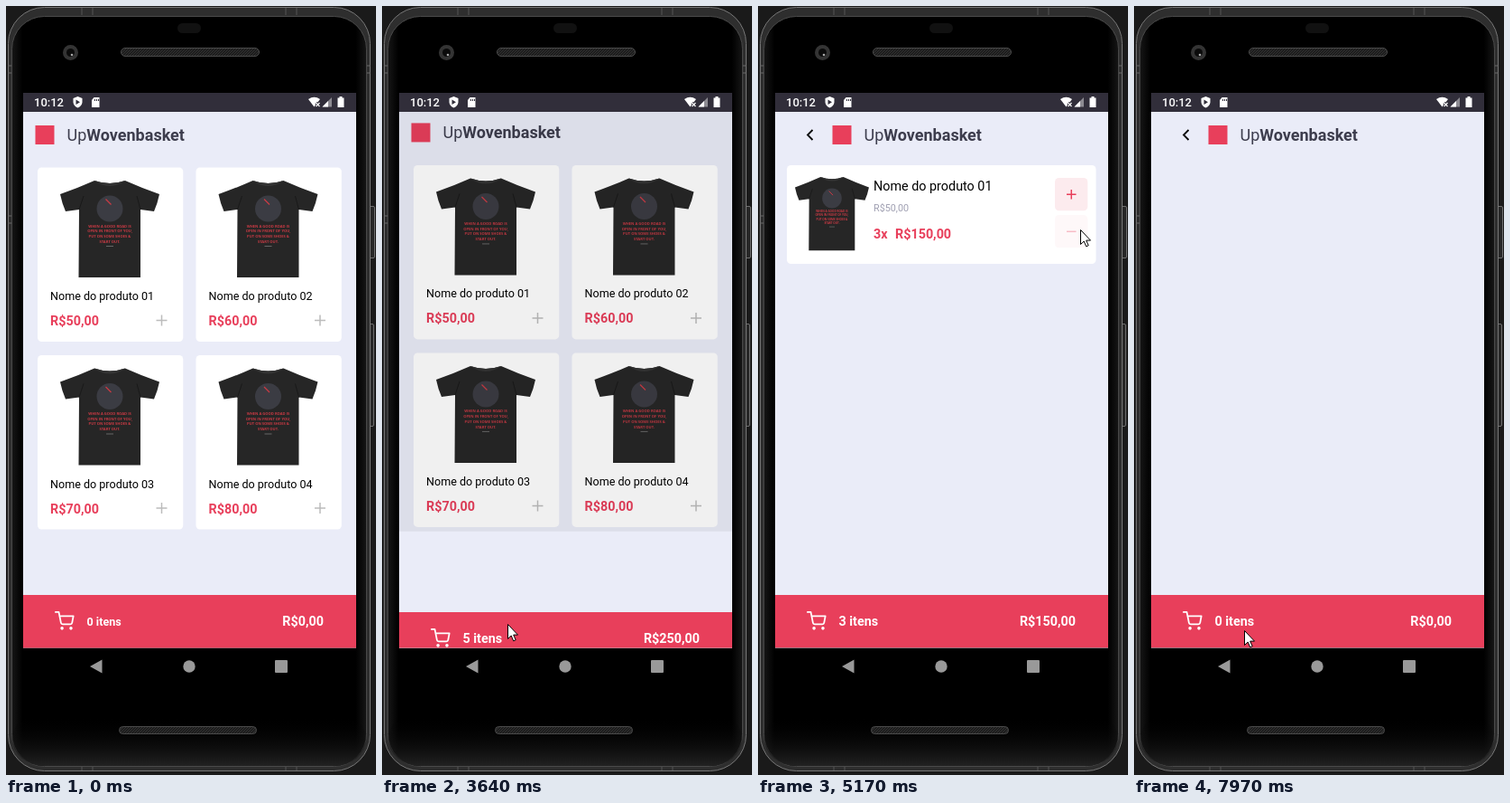
These frames come from a looping animation (410 by 850 pixels, 8 s). An HTML page:

```html
<!DOCTYPE html>
<html lang="pt-BR">
<head>
<meta charset="utf-8">
<title>Loja no celular</title>
<style>
html, body { margin: 0; width: 100%; height: 100%; overflow: hidden; background: #1a1a1a; }
svg { display: block; }
text { font: 14.37px Roboto, sans-serif; white-space: pre; }
.bold { font-weight: 700; }
.red { fill: #e83f5b; }
.white { fill: #fff; }
.brand { font-size: 18px; fill: #3d3d4d; }
.small { font-size: 12.57px; }
.print { font: 700 4.1px "Open Sans", sans-serif; fill: #c93a44; text-anchor: middle; }
.line { fill: none; stroke-width: 1.5; }
</style>
</head>
<body>
<svg id="stage" width="410" height="850" viewBox="0 0 410 850"></svg>
<script>
const LOOP = 8000, TOP = 117, HEIGHT = 592.5, UNIT_PRICE = 50;
const money = value => `R$${value},00`;

const header = x => `
  <rect x="${x}" y="132" width="21" height="21" class="red"/>
  <text x="${x + 35}" y="149" class="brand">Up<tspan class="bold">Wovenbasket</tspan></text>`;

const bar = (id, size) => `
  <rect x="19" y="651" width="369" height="60" class="red"/>
  <g transform="translate(54 669) scale(.898)" fill="none" stroke="#fff" stroke-width="2"
     stroke-linecap="round" stroke-linejoin="round">
    <circle cx="9" cy="21" r="1"/><circle cx="20" cy="21" r="1"/>
    <path d="M1 1h4l2.7 13.4a2 2 0 0 0 2 1.6h9.7a2 2 0 0 0 2-1.6L23 6H6"/>
  </g>
  <text id="${id}Count" x="89.5" y="685.3" class="bold white ${size}"></text>
  <text id="${id}Total" x="352" y="685.3" class="bold white" text-anchor="end"></text>`;

const product = i => `
  <g transform="translate(${i % 2 * 175.5} ${(i >> 1) * 207.5})">
    <rect x="35" y="178.5" width="161.3" height="192.5" rx="4.5" fill="#fff"/>
    <use href="#shirt"/>
    <text x="49" y="325" class="small">Nome do produto 0${i + 1}</text>
    <text x="49" y="353" class="bold red">${money(50 + i * 10)}</text>
    <path id="add${i}" d="M166.5 347.5h12M172.5 341.5v12" class="line" stroke="#bcbcbc"/>
  </g>`;

const button = (id, y, glyph) => `
  <g id="${id}">
    <rect x="329" y="${y}" width="36.3" height="36.3" rx="4.5" fill="#fcebee"/>
    <path d="${glyph}" class="line" stroke="#e83f5b"/>
  </g>`;

const slogan = ["WHEN A GOOD ROAD IS", "OPEN IN FRONT OF YOU,", "PUT ON SOME SHOES &amp;", "START OUT."];

const phone = `
  <rect width="410" height="850" fill="#1a1a1a"/>
  <g fill="#272727" stroke="#707070">
    <rect x="402.5" y="221.5" width="6" height="57" rx="1.5"/>
    <rect x="402.5" y="351.5" width="5" height="113" rx="1.5"/>
  </g>
  <rect x="2.5" y="1.5" width="401" height="844" rx="40" fill="#2e2e2e" stroke="#777"/>
  <path d="M2 66h6M2 74h6M2 232h6M2 240h6M398 66h6M398 74h6" stroke="#6a6a6a"/>
  <path d="M310 2v8M322 2v8M84 2v8M96 2v8M310 838v7M322 838v7M84 838v7M96 838v7" stroke="#555"/>
  <rect x="6.5" y="11.5" width="393" height="829" rx="36" fill="url(#sides)" stroke="#4a4a4a"/>
  <rect x="7" y="780" width="392" height="60" rx="35" fill="url(#bottomEdge)"/>
  <rect x="190" y="19" width="26" height="11" rx="5.5" fill="#111"/>
  <circle cx="71.5" cy="51.5" r="8.5" fill="#343434"/>
  <circle cx="71.5" cy="51.5" r="4.5" fill="#0b0b0b"/>
  <circle cx="73" cy="54" r="1.3" fill="#aaa"/>
  <g fill="url(#mesh)" stroke="#4a4a4a">
    <rect x="127.5" y="46.5" width="153" height="9" rx="4.5"/>
    <rect x="125.5" y="796.5" width="152" height="8" rx="4"/>
  </g>
  <rect x="19" y="96" width="369" height="640" fill="#000"/>
  <rect x="19" y="96" width="369" height="21" fill="#312e3a"/>
  <text x="31" y="111.4" class="white" style="font-size:13px;font-weight:500">10:12</text>
  <path d="M79.5 100l5 2v4.5q-.5 4-5 6q-4.5-2-5-6V102zM97.5 101h6v11h-8.5v-8z" class="white"/>
  <path d="M77.5 103.5v5.5l4.5-2.7z M98 103h1v2h-1zM100 103h1v2h-1zM102 103h1v2h-1z" fill="#312e3a"/>
  <path d="M335 103q6.5-4.5 13 0l-6.5 8.5z" class="white"/>
  <path d="M343.5 107l4 4m0-4l-4 4" stroke="#312e3a" stroke-width="3"/>
  <path d="M343.5 107l4 4m0-4l-4 4" stroke="#fff" stroke-width="1.2"/>
  <path d="M361 101v10.5h-10.5z" fill="#8d8b92"/>
  <path d="M357 105v6.5h-6.5z" class="white"/>
  <path d="M369.5 100h3v1.5h2V112h-7v-10.5h2z" class="white"/>
  <g fill="#999">
    <path d="M93 730l13.5-7.5v15z"/><circle cx="203" cy="730" r="6.7"/>
    <rect x="298" y="723" width="14" height="14" rx="1"/>
  </g>`;

const gradient = (id, vertical, stops) => `
  <linearGradient id="${id}" ${vertical ? 'x2="0" y2="1"' : ""}>
    ${stops.map(([at, color]) => `<stop offset="${at}" stop-color="${color}"/>`).join("")}
  </linearGradient>`;

stage.innerHTML = `
  <defs>
    ${gradient("sides", false, [[0, "#161616"], [.03, "#000"], [.97, "#000"], [1, "#161616"]])}
    ${gradient("bottomEdge", true, [[.1, "#0000"], [1, "#222"]])}
    <pattern id="mesh" width="3" height="3" patternUnits="userSpaceOnUse">
      <rect width="3" height="3" fill="#1c1c1c"/><path d="M0 3L3 0" stroke="#333"/>
    </pattern>
    <clipPath id="screen"><rect x="19" y="${TOP}" width="369" height="${HEIGHT}"/></clipPath>
    <clipPath id="reveal"><rect id="revealBox" x="19" width="369" height="${HEIGHT}"/></clipPath>
    <g id="shirt">
      <path d="M98 193Q115 199 132 193Q150 201 170 208Q168 218 164 227L149 225V300H80.500L81 225L66 227Q62 218 60 208Q80 201 98 193Z" fill="#262626"/>
      <path d="M98 193Q115 199 132 193Q115 205 98 193Z" fill="#333"/>
      <path d="M81 225L86 210M149 225L145 210" stroke="#191919"/>
      <circle cx="115" cy="224" r="14.5" fill="#3b3c43"/>
      <path d="M110.5 213.5l6 6" stroke="#c93a44" stroke-width="1.3"/>
      ${slogan.map((row, i) => `<text x="115" y="${244.5 + i * 5.7}" class="print">${row}</text>`).join("")}
      <path d="M111 265.5h8" stroke="#777" stroke-width=".8"/>
    </g>
  </defs>
  ${phone}
  <g clip-path="url(#screen)">
    <g id="home">
      <rect x="19" y="${TOP}" width="369" height="620" fill="#eaecf8"/>
      ${header(32.5)}${[0, 1, 2, 3].map(product).join("")}${bar("home", "small")}
    </g>
    <rect id="shade" x="19" y="${TOP}" width="369" height="${HEIGHT}"/>
    <g clip-path="url(#reveal)">
      <g id="cart">
        <rect x="19" y="${TOP}" width="369" height="${HEIGHT}" fill="#eaecf8"/>
        <path d="M60.5 137l-5.5 5.5 5.5 5.5" class="line" stroke="#000" style="stroke-width:1.8"/>
        ${header(82.5)}
        <g id="item">
          <rect x="32" y="176" width="342.5" height="109" rx="4.5" fill="#fff"/>
          <use href="#shirt" transform="translate(-3.7 42.3) scale(.745 .76)"/>
          <text x="128" y="204.3">Nome do produto 01</text>
          <text x="128" y="227" style="font-size:10.8px" fill="#a0a0b2">${money(UNIT_PRICE)}</text>
          <text id="quantity" x="128" y="257.3" class="bold red"></text>
          <text id="subtotal" x="152" y="257.3" class="bold red"></text>
          ${button("plus", 190, "M342 208.3h10.5M347.25 203v10.5")}
          ${button("minus", 231, "M342 249.3h10.5")}
        </g>
        ${bar("cart", "")}
      </g>
    </g>
  </g>
  <g id="pointer">
    <circle id="glow" cx="-1" cy="-1" r="12" fill="#fff03c" opacity=".75"/>
    <path d="M.5 .5V16.5L4.2 13 6.7 18.8 9.2 17.7 6.7 12.1H11.5Z" fill="#fff" stroke="#000"/>
  </g>`;

const el = id => document.getElementById(id);
const clamp = x => Math.min(1, Math.max(0, x));
const smooth = x => x * x * (3 - 2 * x);

// [press, release, button, change in quantity]
const clicks = [
  [1010, 1370, "add0", 1], [1380, 1680, "add0", 1], [1690, 1990, "add0", 1],
  [2000, 2300, "add0", 1], [2350, 2650, "add0", 1],
  [4710, 4820, "minus", -1], [4900, 5000, "minus", -1], [5060, 5210, "minus", -1],
  [5840, 6000, "plus", 1], [6200, 6420, "plus", 1],
  [6590, 6700, "minus", -1], [6760, 6860, "minus", -1], [6920, 7020, "minus", -1], [7080, 7200, "minus", -1]
];

// [time, x, y] of the pointer's tip
const path = [
  [170, 308, 849], [960, 175, 345], [1370, 175, 345], [1480, 175, 348], [3050, 175, 348],
  [3420, 139, 683], [3700, 139, 683], [4150, 290, 286], [4600, 357, 247], [5500, 357, 247],
  [5750, 350, 207], [6440, 350, 207], [6580, 351, 257], [7460, 351, 257], [7970, 122, 690]
];

function pointerAt(t) {
  const i = path.findIndex(p => p[0] > t);
  if (i < 0) return path.at(-1).slice(1);
  const [a, b] = [path[Math.max(0, i - 1)], path[i]];
  const k = smooth(clamp((t - a[0]) / (b[0] - a[0])));
  return [a[1] + (b[1] - a[1]) * k, a[2] + (b[2] - a[2]) * k];
}

// cubic-bezier(.208, .82, .25, 1)
function easeReveal(x) {
  const curve = (s, a, b) => 3 * a * s * (1 - s) ** 2 + 3 * b * s * s * (1 - s) + s ** 3;
  let lo = 0, hi = 1;
  for (let i = 0; i < 20; i++) {
    const mid = (lo + hi) / 2;
    if (curve(mid, .20833, .25) < x) lo = mid; else hi = mid;
  }
  return x <= 0 ? 0 : x >= 1 ? 1 : curve(lo, .82, 1);
}

function opacityOf(id, t) {
  const faded = clicks.filter(c => c[2] === id).map(([press, release]) =>
    clamp((t - press - 30) / 100) * (1 - clamp((t - release) / 250)));
  return 1 - .8 * Math.max(...faded);
}

function draw(t) {
  const count = clicks.reduce((sum, c) => sum + (t >= c[1] ? c[3] : 0), 0);
  const total = money(count * UNIT_PRICE);
  for (const id of ["home", "cart"]) {
    el(id + "Count").textContent = count + " itens";
    el(id + "Total").textContent = total;
  }
  el("quantity").textContent = count + "x";
  el("subtotal").textContent = total;
  el("item").style.display = count ? "" : "none";
  for (const id of ["add0", "plus", "minus"]) el(id).setAttribute("opacity", opacityOf(id, t));

  const p = easeReveal((t - 3617.3) / 425), rest = HEIGHT * (1 - p);
  el("home").setAttribute("transform", `translate(0 ${-.02 * HEIGHT * p})`);
  el("shade").setAttribute("opacity", .1 * clamp(p / .36));
  el("revealBox").setAttribute("y", TOP + rest);
  el("cart").setAttribute("transform", `translate(0 ${rest * .041})`);

  const [x, y] = pointerAt(t);
  el("pointer").setAttribute("transform", `translate(${x} ${y})`);
  el("pointer").style.display = t < 170 ? "none" : "";
  el("glow").style.display = clicks.some(c => t >= c[0] && t < c[0] + 90) ? "" : "none";
}

const start = performance.now();
function tick() {
  draw((performance.now() - start) % LOOP);
  requestAnimationFrame(tick);
}
tick();
</script>
</body>
</html>
```
